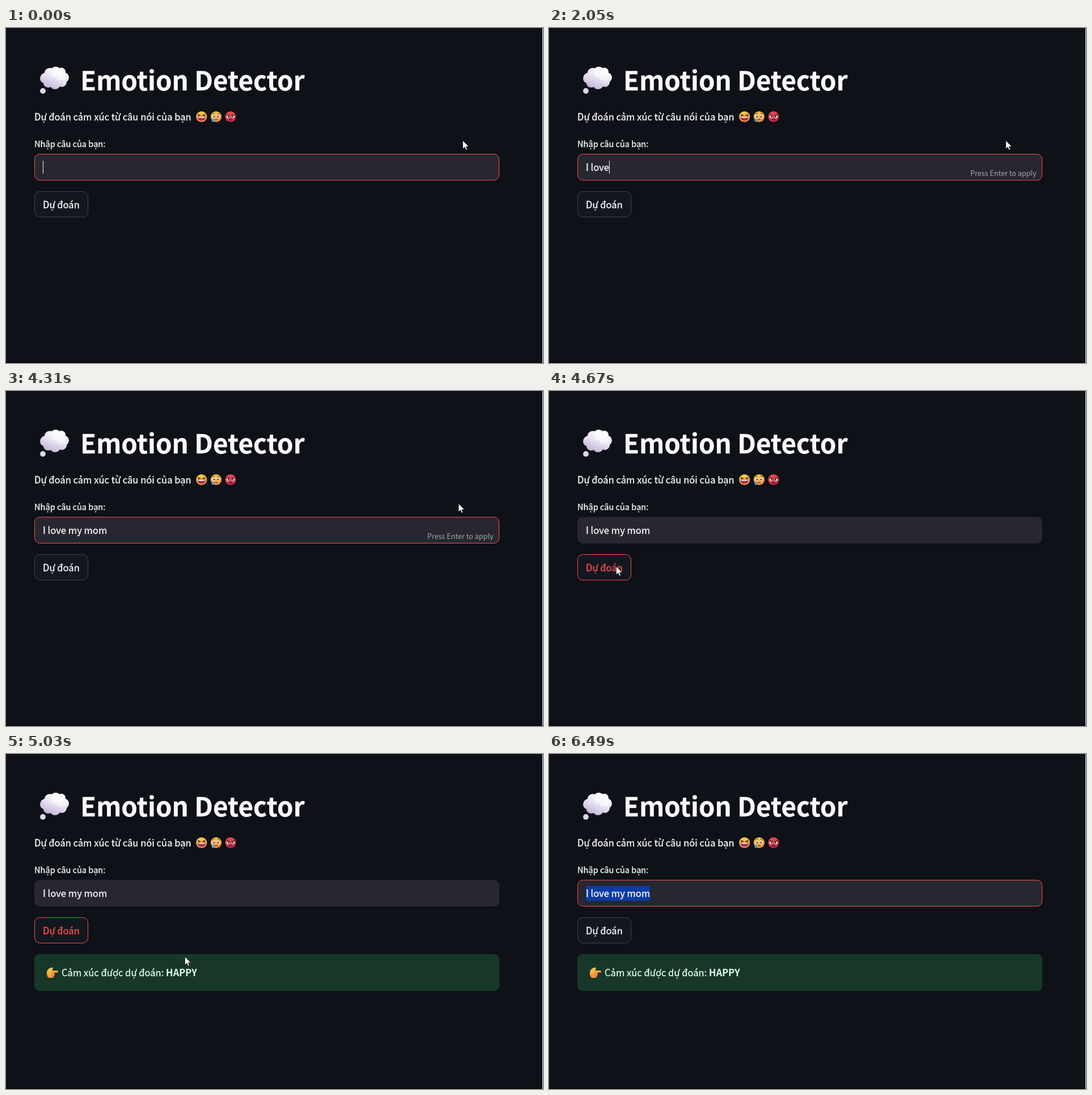
Write an HTML page that moves like this. It is 947x591 px and loops after 8000 ms.

```html
<!DOCTYPE html>
<html lang="vi">
<head>
<meta charset="utf-8">
<title>Emotion Detector</title>
<style>
  html, body { margin: 0; width: 100%; height: 100%; overflow: hidden; background: #0e1117; }
  svg { display: block; width: 947px; height: 591px; color: #fafafa; }
  text {
    font: 16.6px "Noto Sans CJK JP", "Noto Sans CJK SC", "Noto Sans", sans-serif;
    fill: currentColor; stroke: currentColor; stroke-width: .3; white-space: pre;
  }
  .title { font-size: 45.8px; font-weight: 700; }
  .label { font-size: 14.6px; }
  .hint { font-size: 12.6px; opacity: .6; stroke: none; text-anchor: end; }
  .note { color: #dffde9; }
  .bold { font-weight: 700; stroke: none; }
  #field { fill: #262730; stroke: #262730; }
  #field.on { stroke: #ff4b4b; }
  #button rect { fill: #131720; stroke: #41444c; }
  #button.on { color: #ff4b4b; }
  #button.on rect { stroke: #ff4b4b; }
</style>
</head>
<body>
<svg viewBox="0 0 947 591">
  <defs>
    <linearGradient id="puff" x1=".75" y1=".1" x2=".3" y2="1">
      <stop offset="0" stop-color="#fff"/><stop offset=".45" stop-color="#e9e4f1"/><stop offset="1" stop-color="#bfb2d6"/>
    </linearGradient>
    <linearGradient id="gold" x1=".3" y1="0" x2=".6" y2="1">
      <stop offset="0" stop-color="#ffd04a"/><stop offset="1" stop-color="#f4893a"/>
    </linearGradient>
    <linearGradient id="rage" x1=".3" y1="0" x2=".6" y2="1">
      <stop offset="0" stop-color="#ee4f4c"/><stop offset="1" stop-color="#bd2444"/>
    </linearGradient>
  </defs>

  <rect width="947" height="591" fill="#0e1117"/>
  <rect y="589" width="946" height="2" fill="#07080c"/>
  <rect x="946" width="1" height="591" fill="#f4f4f5"/>

  <!-- thought cloud -->
  <path fill="url(#puff)" d="M68 79C68 72 76 69 81 71C85 67 92 68 94 71C100 68 106 73 105 79C112 81 113 91 107 95C107 102 100 106 95 103C92 109 82 110 79 104C73 107 66 103 66 97C58 95 58 82 68 79Z"/>
  <path fill="#fff" opacity=".5" d="M80 82C78 75 88 70 94 74C101 71 105 77 102 82C108 87 104 93 99 91C94 95 89 90 89 87C84 88 80 86 80 82Z"/>
  <circle cx="65" cy="111" r="4.9" fill="#dcd9e2"/>
  <text class="title" x="131" y="110">Emotion Detector</text>

  <!-- laughing, crying and angry faces -->
  <text x="50" y="163">Dự đoán cảm xúc từ câu nói của bạn</text>
  <g transform="translate(344.8 156.5)">
    <circle r="9.6" fill="url(#gold)"/>
    <path d="M-6.5-4L-2.5-2.3L-6.5-.8M6.5-4L2.5-2.3L6.5-.8" fill="none" stroke="#4b2a35" stroke-width="1.4"/>
    <path d="M-6.6 1H6.6C6.4 9-6.4 9-6.6 1Z" fill="#8c1d4e"/>
    <path d="M-5.4 1H5.4L5 2.6H-5Z" fill="#fff"/>
    <path d="M-3.5 6C-1.5 4.6 1.5 4.6 3.5 6C1.5 7.4-1.5 7.4-3.5 6Z" fill="#ef3f72"/>
  </g>
  <g transform="translate(370.5 156.5)">
    <circle r="9.6" fill="url(#gold)"/>
    <g fill="#fff"><circle cx="-3.8" cy="-.8" r="2.7"/><circle cx="3.8" cy="-.8" r="2.7"/></g>
    <g fill="#3a2937"><circle cx="-3.5" cy="-.5" r="1.6"/><circle cx="3.5" cy="-.5" r="1.6"/></g>
    <path d="M-6.5-4.4Q-4-5-2.5-7M6.5-4.4Q4-5 2.5-7M-2.4 6.2Q0 3.6 2.4 6.2" fill="none" stroke="#63343a" stroke-width="1.2"/>
    <path d="M-5.6 2.6C-4 5-3.4 6-3.4 7.2C-3.4 9.8-7.8 9.8-7.8 7.2C-7.8 6-7.2 5-5.6 2.6Z" fill="#31a9e8"/>
  </g>
  <g transform="translate(396 156.5)">
    <circle r="9.6" fill="url(#rage)"/>
    <g fill="#fff"><circle cx="-4" r="2.7"/><circle cx="4" r="2.7"/></g>
    <g fill="#3b1c30"><circle cx="-3.5" cy=".3" r="1.5"/><circle cx="3.5" cy=".3" r="1.5"/></g>
    <path d="M-7.2-3.8L-1.4-1.2M7.2-3.8L1.4-1.2M-2.8 6Q0 3.8 2.8 6" fill="none" stroke="#3b1c30" stroke-width="1.5"/>
  </g>

  <text class="label" x="50" y="209.5">Nhập câu của bạn:</text>
  <rect id="field" x="50.5" y="222.5" width="819" height="46" rx="9"/>
  <rect id="mark" y="233" height="26" fill="#0b3ba6"/>
  <text id="typed" x="65" y="252"></text>
  <rect id="caret" y="234" width="1" height="23" fill="#fafafa"/>
  <text id="hint" class="hint" x="859.5" y="261">Press Enter to apply</text>

  <g id="button">
    <rect x="50.5" y="288.5" width="94" height="45" rx="9"/>
    <text x="65" y="317.5">Dự đoán</text>
  </g>

  <g id="result">
    <rect x="50" y="353" width="820" height="65" rx="9" fill="#173828"/>
    <path fill="url(#gold)" d="M72 386C72 381 76 378 79 377C82 376 84 378 82 380L81 382H90C92.6 382 92.6 385.6 90 385.6H84.5C86.5 386 86.5 388.6 85 389C86 390 85.6 391.7 84.2 392C84.6 394 83 395 81 395H77C73.5 395 72 391 72 386Z"/>
    <path d="M80 385.6H85M80 389H85M80 392H84" stroke="#cf6d2b" stroke-width=".8"/>
    <text class="note" x="98" y="392">Cảm xúc được dự đoán: <tspan class="bold">HAPPY</tspan></text>
  </g>

  <path id="arrow" d="M.5.5V15.2L3.9 12L6.1 17.2L8.5 16.2L6.3 11.2H11Z" fill="#fff" stroke="#111" stroke-width=".8"/>
  <path id="beam" d="M-3-7H-1L0-6L1-7H3M0-6V6M-3 7H-1L0 6L1 7H3" fill="none" stroke="#d5d5d8"/>
</svg>

<script>
const LOOP = 8000, LEAVE = 4310, TICK = 120;
const PRESS = 4670, ANSWER = 4910, GRAB = 6350;
const phrase = "I love my mom";

const $ = id => document.getElementById(id);
const show = (el, on) => el.setAttribute("visibility", on ? "visible" : "hidden");
const within = (t, a, b) => t >= a && t < b;
const smooth = p => p * p * (3 - 2 * p);

// Pointer stops: time, x, y
const stops = [
  [LEAVE, 797.5, 198], [PRESS, 118, 309], [ANSWER, 193.5, 320], [5030, 315, 357], [5270, 349, 356],
  [5510, 349, 356], [5990, 227.5, 250.5], [6230, 227.5, 250.5], [6470, -2.5, 251.5]
];

function pointer(t) {
  if (t < LEAVE) return [805, 198];
  const time = LEAVE + Math.floor((t - LEAVE) / TICK) * TICK;
  const next = stops.findIndex(s => s[0] > time);
  if (next < 0) return stops.at(-1).slice(1);
  const [t0, x0, y0] = stops[next - 1], [t1, x1, y1] = stops[next];
  const p = smooth((time - t0) / (t1 - t0));
  return [x0 + (x1 - x0) * p, y0 + (y1 - y0) * p];
}

// A first letter, a quick burst, then a steady pace.
function letters(t) {
  if (t < 280) return 0;
  if (t < 940) return 1;
  if (t < 1620) return Math.min(4, 2 + Math.floor((t - 940) / 135));
  return Math.min(phrase.length, 5 + Math.floor((t - 1620) / 270));
}

const pen = document.createElement("canvas").getContext("2d");
function width(n) {
  const { fontSize, fontFamily } = getComputedStyle($("typed"));
  pen.font = `${fontSize} ${fontFamily}`;
  return pen.measureText(phrase.slice(0, n)).width;
}

function draw(t) {
  const n = letters(t);
  const [x, y] = pointer(t);

  $("typed").textContent = phrase.slice(0, n);
  $("caret").setAttribute("x", Math.round(65 + width(n)));
  show($("caret"), t < LEAVE && !within(t, 790, 940));
  show($("hint"), within(t, 280, PRESS));

  $("field").classList.toggle("on", !within(t, PRESS, GRAB));
  $("button").classList.toggle("on", within(t, PRESS, GRAB));
  show($("result"), t >= ANSWER);
  $("result").setAttribute("opacity", t < ANSWER + TICK ? .36 : 1);

  // Selection runs from the pointer to the end of the phrase.
  const from = Math.max(65, x), end = 65 + width(phrase.length);
  $("mark").setAttribute("x", from);
  $("mark").setAttribute("width", Math.max(0, end - from));
  show($("mark"), t >= GRAB);

  const overField = y > 222 && y < 269;
  show($("arrow"), !overField);
  show($("beam"), overField);
  for (const id of ["arrow", "beam"]) $(id).setAttribute("transform", `translate(${x} ${y})`);
}

const begin = performance.now();
function tick() {
  draw((performance.now() - begin) % LOOP);
  requestAnimationFrame(tick);
}
tick();
</script>
</body>
</html>
```
